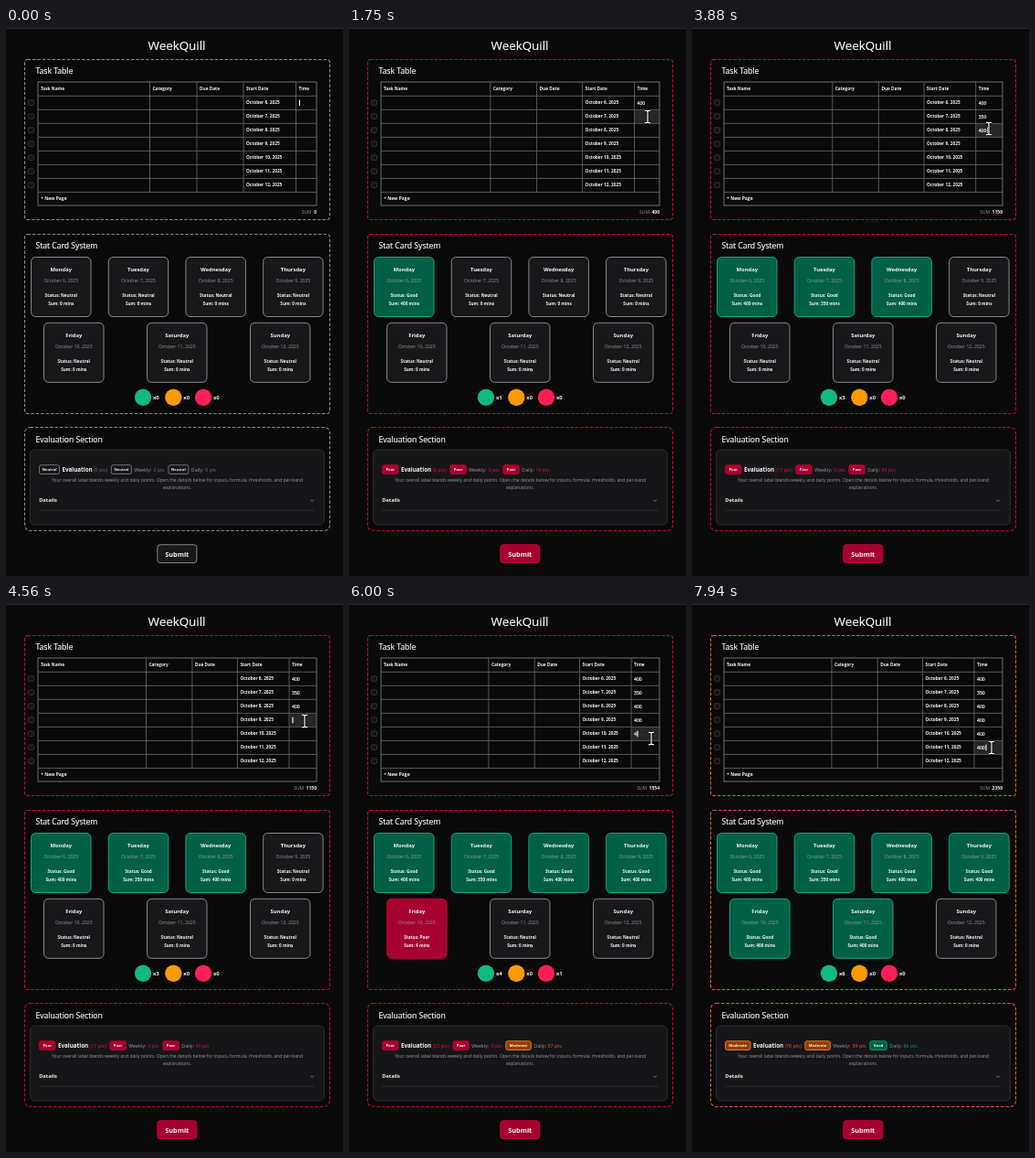
An HTML page that plays this animation: 369 px wide and 599 px high, repeating every 8 s.

```html
<!DOCTYPE html>
<html lang="en">
<head>
<meta charset="utf-8">
<title>WeekQuill</title>
<style>
  html, body { margin: 0; width: 100%; height: 100%; overflow: hidden; background: #09090a; }
  svg { display: block; width: 100%; height: 100%; font-family: "Open Sans", "Noto Sans", sans-serif; }
  text { fill: #f4f4f5; white-space: pre; }
  .b { font-weight: 700; }
  .head { stroke: #f4f4f5; stroke-width: .2; }
  .mid { text-anchor: middle; }
  .dim { fill: #96969d; }
  .dash { fill: none; stroke-dasharray: 3.6 1.8; stroke-width: 1.1; }
  .grid { stroke: #606062; fill: none; stroke-width: .9; }
</style>
</head>
<body>
<svg id="stage" viewBox="0 0 369 599" preserveAspectRatio="none"></svg>
<script>
const LOOP = 8000;
const stage = document.getElementById('stage');

function add(tag, attrs, parent = stage) {
  const el = document.createElementNS('http://www.w3.org/2000/svg', tag);
  set(el, attrs);
  parent.appendChild(el);
  return el;
}
function set(el, attrs) {
  for (const k in attrs) el.setAttribute(k, attrs[k]);
}
function label(str, x, y, size, cls = '', parent = stage) {
  const el = add('text', { x, y, 'font-size': size, class: cls }, parent);
  el.textContent = str;
  return el;
}
const box = (x, y, width, height, rx, more = {}) => add('rect', { x, y, width, height, rx, ...more });
function write(el, str) {
  if (el.textContent !== str) el.textContent = str;
}

// Schedule: when each time cell gets focus and when its digits are typed
const ROWS = [
  { focus: -440, keys: [690, 880, 1060], text: '400' },
  { focus: 2000, keys: [2250, 2440, 2630], text: '350' },
  { focus: 3120, keys: [3380, 3560, 3750], text: '400' },
  { focus: 4400, keys: [4750, 4940, 5130], text: '400' },
  { focus: 5560, keys: [5810, 6070, 6260], text: '400' },
  { focus: 6880, keys: [7130, 7630, 7750], text: '400' },
  { focus: 1e9, keys: [], text: '' }
];
const SHIFT = [5, 6, 6.8, 7.5, 8.5, 8.5];
const PATH = [
  [1380, 324, 84], [1620, 327, 97], [2750, 327, 97], [2900, 325, 110],
  [4000, 325, 110], [4250, 327, 128], [5300, 327, 128], [5520, 331, 147],
  [6500, 331, 147], [6780, 328, 157], [LOOP, 328, 157]
];
const DAYS = ['Monday', 'Tuesday', 'Wednesday', 'Thursday', 'Friday', 'Saturday', 'Sunday'];

const LOOKS = {
  Neutral:  { fill: [24, 24, 27], edge: [136, 136, 139], line: [134, 134, 134], note: [112, 112, 118], badge: 22.5 },
  Poor:     { fill: [165, 0, 48], edge: [199, 0, 54], line: [196, 8, 44], note: [236, 14, 54], badge: 18 },
  Moderate: { fill: [151, 60, 0], edge: [245, 140, 50], line: [238, 104, 62], note: [242, 88, 40], badge: 28 },
  Good:     { fill: [0, 96, 69], edge: [14, 168, 118], line: [16, 185, 129], note: [0, 160, 112], badge: 19 }
};

const grade = (n, mid, top) => n >= top ? 'Good' : n >= mid ? 'Moderate' : 'Poor';

function stateAt(t) {
  const vals = ROWS.map(r => r.text.slice(0, r.keys.filter(k => k <= t).length));
  const cards = vals.map(v => v === '' ? 'Neutral' : +v >= 300 ? 'Good' : 'Poor');
  const count = s => cards.filter(c => c === s).length;
  const sum = vals.reduce((a, v) => a + +v, 0);
  const daily = Math.round(count('Good') / 7 * 100);
  const weekly = sum >= 2300 ? 59 : 0;
  const total = Math.round(.4 * daily + .6 * weekly);
  const pts = [total, weekly, daily];
  const ranks = sum ? pts.map(p => grade(p, 50, 80)) : pts.map(() => 'Neutral');
  const focus = ROWS.filter(r => r.focus <= t).length - 1;
  return { vals, cards, count, sum, pts, ranks, focus };
}

// Linear colour fade: the mean of the look over the last few moments
function fader(t, span) {
  const n = 8;
  const past = Array.from({ length: n }, (_, i) => stateAt(t - span * i / n));
  return (pick, part) => {
    const c = [0, 0, 0];
    for (const s of past) LOOKS[pick(s)][part].forEach((v, i) => c[i] += v / n);
    return `rgb(${c.map(Math.round)})`;
  };
}

// Page frame
box(0, 0, 369, 599, 0, { fill: '#09090a' });
box(0, 0, 369, 1, 0, { fill: '#2a2a2c' });
label('WeekQuill', 187, 24.4, 13.4, 'mid head');
const frames = [[34.5, 175, 3], [225.5, 196, 3], [436.5, 113, 6]]
  .map(([y, h, r]) => box(20.5, y, 334, h, r, { class: 'dash' }));
label('Task Table', 32.5, 49.6, 8.6, 'head');
label('Stat Card System', 32.5, 241, 8.6, 'head');
label('Evaluation Section', 32.5, 452.6, 8.6, 'head');

// Table
const TOP = 74.3, STEP = 15.02;
const rowY = i => TOP + STEP * i;
const hover = box(0, 0, 0, STEP - 1, 0, { fill: '#262629' });
box(35, 59, 305, 135, 0, { class: 'grid', style: 'stroke:#7a7a7c' });
for (let i = 0; i < 8; i++) add('path', { d: `M35 ${rowY(i)}H340`, class: 'grid' });
const COLS = [
  { x: 157.5, k: .54, name: 'Category' },
  { x: 209, k: .68, name: 'Due Date' },
  { x: 260, k: .88, name: 'Start Date' },
  { x: 317.5, k: 1, name: 'Time' }
];
label('Task Name', 38, 68.2, 4.75, 'b');
for (const c of COLS) {
  c.group = add('g', {});
  add('path', { d: `M0 59V${rowY(7)}`, class: 'grid' }, c.group);
  label(c.name, 3, 68.2, 4.75, 'b', c.group);
}
const cells = DAYS.map((_, i) => {
  const y = rowY(i) + 9.2;
  box(24.5, y - 4.7, 6, 5.6, 1.2, { fill: '#111113', stroke: '#3a3a3d', 'stroke-width': .8 });
  label(`October ${6 + i}, 2025`, 3, y - .2, 4.75, 'b', COLS[2].group);
  return label('', 3, y + .3, 5.1, 'head', COLS[3].group);
});
label('+ New Page', 38, 188.3, 5, 'b');
const caret = add('rect', { width: 1.1, height: 6.6, fill: '#fff' }, COLS[3].group);
const sumLine = add('text', { x: 340, y: 203.2, 'font-size': 5, 'text-anchor': 'end' });
add('tspan', { class: 'dim' }, sumLine).textContent = 'SUM';
const sumText = add('tspan', { dx: 2.5, 'font-weight': 700 }, sumLine);

// Day cards
const cards = DAYS.map((day, i) => {
  const x = i < 4 ? 27.5 + 84.7 * i : 41.5 + 113 * (i - 4);
  const y = i < 4 ? 250.5 : 322.3;
  const mid = x + 32.8;
  const rect = box(x, y, 65.5, 65, 5);
  label(day, mid, y + 15.6, 5.85, 'b mid');
  label(`October ${6 + i}, 2025`, mid, y + 27.3, 5.1, 'mid').setAttribute('style', 'fill:#a6a6ad;opacity:.85');
  return {
    rect,
    status: label('', mid, y + 43.3, 4.7, 'b mid'),
    sum: label('', mid, y + 52.2, 4.7, 'b mid')
  };
});
const tallies = [['Good', 150, '#12b886'], ['Moderate', 183.3, '#fe9a00'], ['Poor', 216, '#ff1f57']]
  .map(([name, x, fill]) => {
    add('circle', { cx: x, cy: 403.7, r: 9.2, fill });
    return { name, el: label('', x + 11, 405.8, 5.8, 'b') };
  });

// Evaluation panel
box(26.5, 461, 322, 82, 5, { fill: '#161618', stroke: '#2b2b2e' });
const items = ['Evaluation', 'Weekly:', 'Daily:'].map((name, i) => ({
  width: [32.5, 19.2, 13.3][i],
  badge: box(0, 477.7, 0, 9.8, 2, { 'stroke-width': .8 }),
  rank: label('', 0, 484.1, 4.1, 'b mid'),
  name: label(name, 0, i ? 484.5 : 484.8, i ? 5.3 : 6.25, i ? 'dim' : 'b'),
  pts: label('', 0, 484.5, 5.3)
}));
label('Your overall label blends weekly and daily points. Open the details below for inputs, formula, thresholds, and per-band',
  187.5, 496.4, 5, 'mid dim');
label('explanations.', 187.5, 503.6, 5, 'mid dim');
label('Details', 36.3, 518, 5.6, 'b');
add('path', { d: 'M333.5 515.7l1.7 1.7 1.7-1.7', fill: 'none', stroke: '#8b8b92', 'stroke-width': .8 });
add('path', { d: 'M36.5 527.3H338', stroke: '#343437', 'stroke-width': .9 });

const button = box(165.8, 564.8, 43, 19.8, 3);
label('Submit', 187.3, 577.8, 7.3, 'b mid');

// Text pointer
const beam = 'M-3 -6.6H-1Q0 -6.6 0 -5.6Q0 -6.6 1 -6.6H3M0 -5.6V5.6M-3 6.6H-1Q0 6.6 0 5.6Q0 6.6 1 6.6H3';
const pointer = add('g', { fill: 'none' });
add('path', { d: beam, stroke: '#000', 'stroke-width': 2.6 }, pointer);
add('path', { d: beam, stroke: '#fff', 'stroke-width': 1.2 }, pointer);

function pointerAt(t) {
  const i = PATH.findIndex(p => p[0] > t);
  if (i < 1) return null;
  const [a, b] = [PATH[i - 1], PATH[i]];
  const u = (t - a[0]) / (b[0] - a[0]);
  const e = u * u * (3 - 2 * u);
  return [a[1] + (b[1] - a[1]) * e, a[2] + (b[2] - a[2]) * e];
}

function drawTable(t, s) {
  const shift = s.sum ? SHIFT[s.focus] : 0;
  for (const c of COLS) set(c.group, { transform: `translate(${c.x - shift * c.k} 0)` });
  s.vals.forEach((v, i) => write(cells[i], v));
  write(sumText, String(s.sum));

  const row = ROWS[s.focus];
  const last = Math.max(row.focus, ...row.keys.filter(k => k <= t));
  const on = (t - last) % 1000 < 500;
  set(caret, { x: 3.4 + 3 * s.vals[s.focus].length, y: rowY(s.focus) + 4.2, opacity: on ? 1 : 0 });

  const p = pointerAt(t);
  set(pointer, { opacity: p ? 1 : 0 });
  set(hover, { opacity: p ? 1 : 0 });
  if (!p) return;
  set(pointer, { transform: `translate(${p})` });
  const x = COLS[3].x - shift + .5;
  set(hover, { x, width: 339.5 - x, y: rowY(Math.floor((p[1] - TOP) / STEP)) + .5 });
}

function drawCards(s, fade) {
  cards.forEach((c, i) => {
    const pick = q => q.cards[i];
    set(c.rect, { fill: fade(pick, 'fill'), stroke: fade(pick, 'edge') });
    write(c.status, 'Status: ' + s.cards[i]);
    write(c.sum, `Sum: ${+s.vals[i]} mins`);
  });
  for (const c of tallies) write(c.el, 'x' + s.count(c.name));
}

function drawPanel(s, fade) {
  let x = 36.5;
  items.forEach((it, i) => {
    const pick = q => q.ranks[i];
    const w = LOOKS[s.ranks[i]].badge;
    const pts = `${s.pts[i]} pts`;
    set(it.badge, { x, width: w - .5, fill: fade(pick, 'fill'), stroke: fade(pick, 'edge') });
    set(it.rank, { x: x + w / 2 - .2 });
    write(it.rank, s.ranks[i]);
    x += w + 2.5;
    set(it.name, { x });
    x += it.width + 2;
    set(it.pts, { x, style: 'fill:' + fade(pick, 'note') });
    write(it.pts, i ? pts : `(${pts})`);
    x += (i ? 9 : 12) + 3 * String(s.pts[i]).length + 4.3;
  });
}

function draw(t) {
  const s = stateAt(t);
  const quick = fader(t, 140), slow = fader(t, 260);
  drawTable(t, s);
  drawCards(s, quick);
  drawPanel(s, quick);
  const stroke = slow(q => q.ranks[0], 'line');
  for (const f of frames) set(f, { stroke });
  const pick = q => q.sum ? 'Poor' : 'Neutral';
  set(button, { fill: slow(pick, 'fill'), stroke: slow(pick, 'edge') });
}

const start = performance.now();
function tick() {
  draw((performance.now() - start) % LOOP);
  requestAnimationFrame(tick);
}
tick();
</script>
</body>
</html>
```
